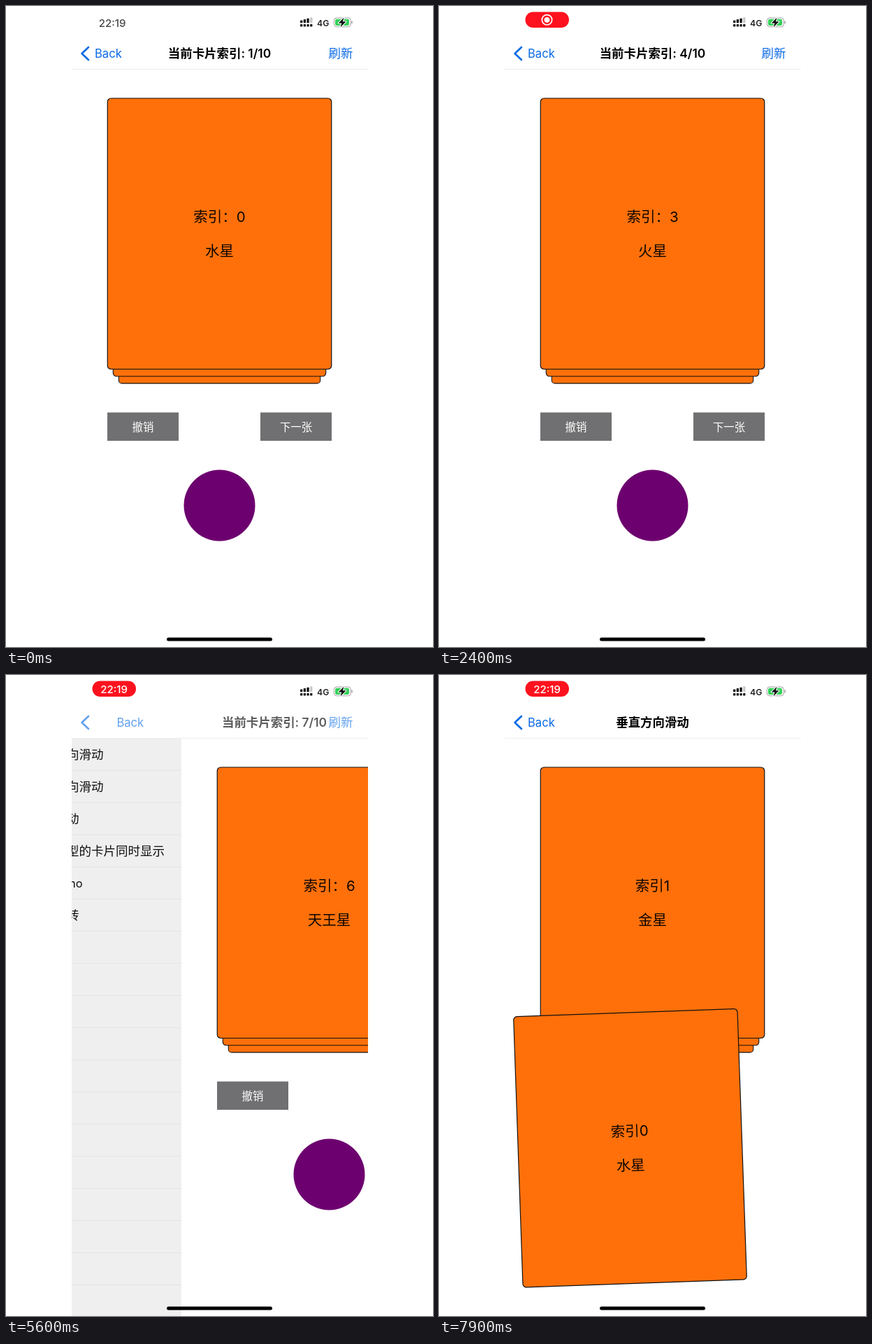
An HTML page with a canvas for the animation above (8 s loop, 611 by 917 pixels).

```html
<!DOCTYPE html>
<html lang="zh-CN">
<head>
<meta charset="utf-8">
<title>Card swipe demo</title>
<style>
html, body { margin: 0; width: 100%; height: 100%; overflow: hidden; background: #fff; }
canvas { display: block; }
</style>
</head>
<body>
<canvas id="stage" width="611" height="917"></canvas>
<script>
const ctx = document.getElementById('stage').getContext('2d');
const LOOP = 8000, STEP = 100;
const LEFT = 94, RIGHT = 518, WIDTH = RIGHT - LEFT, MID = 305.5;
const NAV_BOTTOM = 91;
const FONT = 'Inter, "Noto Sans CJK SC", "Noto Sans CJK", "Noto Sans", sans-serif';
const BLUE = '#0a6ae6', ORANGE = '#ff700a', PURPLE = '#6d006f', RED = '#fd111e';
const CARD_W = 320.5, CARD_H = 387.5, CARD_BOTTOM = 519.5;
const PLANETS = ['水星', '金星', '地球', '火星', '木星', '土星', '天王星', '海王星', '冥王星', '月球'];
const ROWS = ['水平方向滑动', '垂直方向滑动', '无限滑动', '多种类型的卡片同时显示', 'OC Demo', '屏幕旋转'];

// start, duration, direction, vertical travel
const SWIPES = [
  [300, 600, 1, 190],
  [1150, 600, -1, 305],
  [1850, 550, 1, 200],
  [2450, 550, -1, 260],
  [3030, 550, 1, 210],
  [3850, 550, -1, 240]
];

const clamp = v => Math.max(0, Math.min(1, v));
const span = (t, a, b) => clamp((t - a) / (b - a));
const easeOut = v => 1 - (1 - v) ** 3;
const easeInOut = v => v * v * (3 - 2 * v);

function text(str, x, cy, size, color, weight = 400, align = 'center') {
  ctx.font = `${weight} ${size}px ${FONT}`;
  ctx.fillStyle = color;
  ctx.textAlign = align;
  ctx.fillText(str, x, cy + size * 0.37);
}

function rect(x, y, w, h, color) {
  ctx.fillStyle = color;
  ctx.fillRect(x, y, w, h);
}

function round(x, y, w, h, r, fill, stroke, line = 1) {
  ctx.beginPath();
  ctx.roundRect(x, y, w, h, r);
  if (fill) { ctx.fillStyle = fill; ctx.fill(); }
  if (stroke) { ctx.strokeStyle = stroke; ctx.lineWidth = line; ctx.stroke(); }
}

function disc(x, y, r, color) {
  ctx.beginPath();
  ctx.arc(x, y, r, 0, Math.PI * 2);
  ctx.fillStyle = color;
  ctx.fill();
}

function faded(alpha, draw) {
  if (alpha <= 0) return;
  ctx.save();
  ctx.globalAlpha *= alpha;
  draw();
  ctx.restore();
}

function card(x, y, scale, angle, index, colon) {
  ctx.save();
  ctx.translate(x, y);
  ctx.rotate(angle * Math.PI / 180);
  ctx.scale(scale, scale);
  round(-CARD_W / 2, -CARD_H / 2, CARD_W, CARD_H, 5, ORANGE, '#111', 1.2);
  text('索引' + (colon ? '：' : '') + index, 0, -24.5, 20.5, '#0c0600');
  text(PLANETS[index], 0, 24.5, 20.5, '#0c0600');
  ctx.restore();
}

// Cards behind the top one move up a level as it is dragged away.
function deck(top, dx, dy, colon) {
  const lift = clamp(Math.hypot(dx, dy) / 160);
  const moving = lift > 0;
  for (let i = 3; i >= 0; i--) {
    if (top + i >= PLANETS.length || (i === 3 && !moving)) continue;
    if (i === 0) {
      const angle = Math.max(-10, Math.min(10, dx * 0.0625));
      card(MID + dx, CARD_BOTTOM - CARD_H / 2 + dy, 1, angle, top, colon);
    } else {
      const level = Math.min(2, i - lift);
      const scale = 1 - 0.05 * level;
      card(MID, CARD_BOTTOM + 10.2 * level - CARD_H * scale / 2, scale, 0, top + i, colon);
    }
  }
}

function button(x, label) {
  rect(x, 581.5, 102, 40.5, '#706f71');
  text(label, x + 51, 602, 15.4, '#fff');
}

function swipeState(t) {
  let top = 0, shown = 0, dx = 0, dy = 0;
  for (const [start, length, dir, drop] of SWIPES) {
    const u = (t - start) / length;
    if (u >= 0.5) shown++;
    if (u >= 1) top++;
    else if (u > 0) {
      const k = u ** 1.3;
      dx = dir * 440 * k;
      dy = drop * k;
    }
  }
  return { top, shown, dx, dy };
}

function horizontalPage(s) {
  button(145, '撤销');
  button(364, '下一张');
  disc(MID, 714.5, 51, PURPLE);
  deck(s.top, s.dx, s.dy, true);
}

function verticalPage(t) {
  const k = easeInOut(span(t, 7300, 7900));
  deck(0, -32 * k, 351 * k, false);
}

function listPage(t) {
  const glow = span(t, 6600, 6700) * (1 - span(t, 7100, 7300));
  faded(glow, () => rect(LEFT, 137, WIDTH, 46, '#d6d6da'));
  for (let i = 1; i < 18; i++) rect(114.5, 90 + i * 46, RIGHT - 114.5, 1, '#f3f3f3');
  ROWS.forEach((row, i) =>
    text(row, 114.5, 114 + i * 46, row === 'OC Demo' ? 16.5 : 17.5, '#111', 400, 'left'));
}

function page(x, dim, draw) {
  ctx.save();
  ctx.beginPath();
  ctx.rect(LEFT, 0, WIDTH, 917);
  ctx.clip();
  ctx.translate(x, 0);
  rect(LEFT, 0, WIDTH, 917, '#fff');
  draw();
  if (dim > 0) rect(LEFT, 0, WIDTH, 917, `rgba(0,0,0,${dim * 0.1})`);
  ctx.restore();
}

function navBar(title, x, alpha, refresh) {
  faded(alpha, () => {
    ctx.beginPath();
    ctx.moveTo(118, 59);
    ctx.lineTo(108.5, 68);
    ctx.lineTo(118, 77);
    ctx.strokeStyle = BLUE;
    ctx.lineWidth = 2.6;
    ctx.lineCap = 'round';
    ctx.lineJoin = 'round';
    ctx.stroke();
    text('Back', 127 + x * 0.2, 68, 16.6, BLUE, 400, 'left');
    text(title, MID + x * 0.5, 68, 17.45, '#000', 600);
    if (refresh) text('刷新', 479, 68, 17.4, BLUE);
  });
}

function statusBar(t) {
  const pill = span(t, 100, 500);
  if (pill < 1) text('22:19', 152, 24, 15, '#484848', 500);
  faded(pill, () => {
    round(123.5, 8.5, 62.5, 22.5, 11.2, RED);
    const clock = span(t, 2800, 3000);
    faded(1 - clock, () => {
      ctx.beginPath();
      ctx.arc(154.5, 19.8, 7.2, 0, Math.PI * 2);
      ctx.strokeStyle = '#fff';
      ctx.lineWidth = 1.7;
      ctx.stroke();
      disc(154.5, 19.8, 3.9, '#fff');
    });
    faded(clock, () => text('22:19', 154.5, 20, 15, '#fff', 500));
  });

  for (let i = 0; i < 4; i++) {
    const x = 421 + i * 4.7, h = 3.8 + i * 1.4;
    round(x, 24.3 - h, 3.3, h, 0.8, i < 3 ? '#111' : '#c8c8c8');
    round(x, 26, 3.3, 3.6, 0.8, '#111');
  }
  text('4G', 453.7, 24, 12.2, '#222', 600);

  round(469.3, 17, 24, 12.8, 3.8, '#fff', '#a0a0a0');
  round(471, 18.7, 20, 9.4, 2.3, '#33d159');
  round(494.4, 21.3, 1.4, 4.2, 0.7, '#a0a0a0');
  ctx.beginPath();
  ctx.moveTo(483.6, 16.4);
  ctx.lineTo(475.7, 24.4);
  ctx.lineTo(480.3, 24.4);
  ctx.lineTo(478.6, 30.6);
  ctx.lineTo(486.4, 22.3);
  ctx.lineTo(481.8, 22.3);
  ctx.closePath();
  ctx.lineJoin = 'round';
  ctx.strokeStyle = '#fff';
  ctx.lineWidth = 2;
  ctx.stroke();
  ctx.fillStyle = '#080808';
  ctx.fill();
}

function render(t) {
  rect(0, 0, 611, 917, '#fff');
  const pop = easeOut(span(t, 5500, 6200));
  const push = easeOut(span(t, 6700, 7200));
  const s = swipeState(t);

  if (pop > 0 && push < 1) {
    const away = pop < 1 ? 1 - pop : push;
    page(-0.3 * WIDTH * away, away, () => listPage(t));
  }
  if (pop < 1) page(WIDTH * pop, 0, () => horizontalPage(s));
  if (push > 0) page(WIDTH * (1 - push), 0, () => verticalPage(t));

  rect(LEFT, 0, WIDTH, NAV_BOTTOM, '#fff');
  rect(LEFT, 90, WIDTH, 1, '#eeeeee');
  navBar(`当前卡片索引: ${s.shown + 1}/10`, WIDTH * pop, 1 - pop, true);
  navBar(ROWS[1], WIDTH * (1 - push), push, false);
  statusBar(t);
  round(230, 903.5, 151, 5, 2.5, '#000');
}

function tick(now) {
  const t = now % LOOP;
  render(Math.floor(t / STEP) * STEP);
  requestAnimationFrame(tick);
}
requestAnimationFrame(tick);
</script>
</body>
</html>
```
